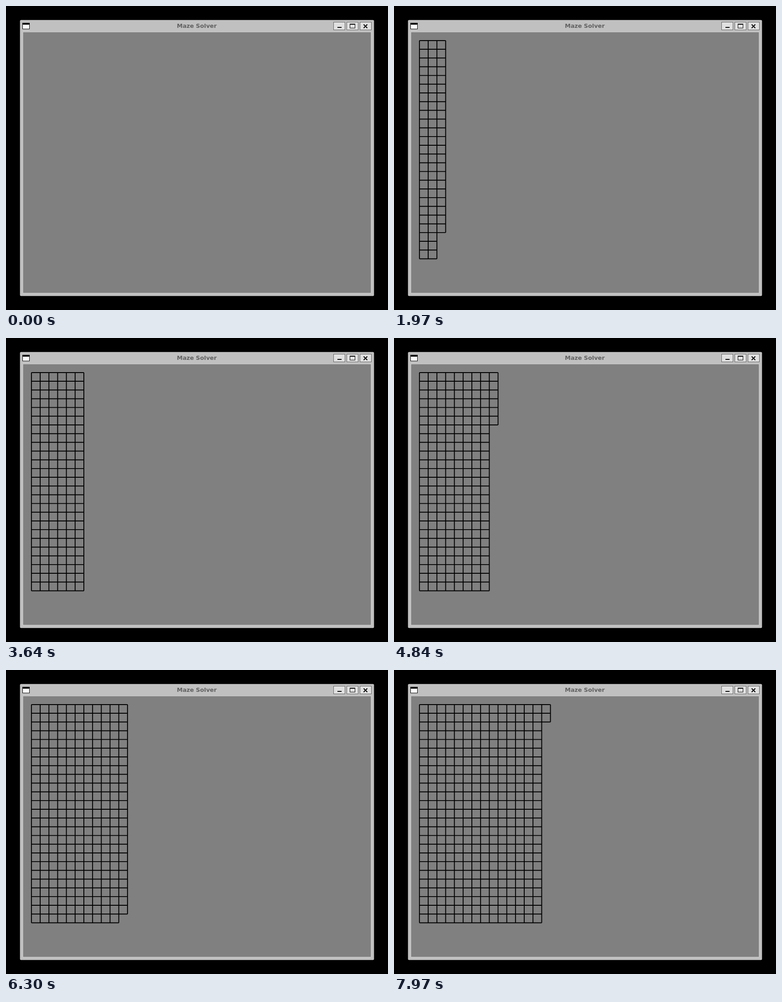
Recreate the animation shown at these times as an HTML page. Size 839x668 px, loop 8 s.

```html
<!DOCTYPE html>
<html lang="en">
<head>
<meta charset="utf-8">
<title>Maze Solver</title>
<style>
  html, body { margin: 0; width: 100%; height: 100%; overflow: hidden; background: #000; }
  svg { display: block; }
  .title { font: bold 12.8px "DejaVu Sans", sans-serif; fill: #606060; text-anchor: middle; }
  .button { fill: #e0e0e0; stroke: #626262; }
  .glyph { fill: none; stroke: #000; }
</style>
</head>
<body>
<svg width="839" height="668" viewBox="0 0 839 668">
  <rect width="839" height="668" fill="#000"/>
  <rect x="30.7" y="30.7" width="777.6" height="606.6" rx="2.5" fill="#c0c0c0"/>

  <rect x="36" y="37" width="16" height="14" fill="#000"/>
  <rect x="37" y="41" width="14" height="9" fill="#fff"/>
  <text class="title" x="419" y="48">Maze Solver</text>

  <rect class="button" x="719.5" y="35.5" width="25" height="17"/>
  <rect class="button" x="748.5" y="35.5" width="25" height="17"/>
  <rect class="button" x="777.5" y="35.5" width="25" height="17"/>
  <path class="glyph" stroke-width="2" d="M728 47h9M755 40h12M785.5 40.5l8 8m0 -8l-8 8"/>
  <rect class="glyph" x="755.5" y="39.5" width="11" height="9"/>

  <rect x="37" y="57" width="765" height="574" fill="#808080" stroke="#d8d8d8"/>
  <path id="grid" fill="none" stroke="#000" stroke-width="1.95"/>
</svg>
<script>
  const LOOP = 8000, START = 500, STEP = 200 / 3;
  const LEFT = 55.9, TOP = 75.9, CELL = 19.18, ROWS = 25;
  const FIRST_CELLS = 3.8, CELLS_PER_STEP = 3.115;
  const grid = document.getElementById('grid');
  let shown = -1;

  function cellsAt(time) {
    if (time < START) return 0;
    const tick = Math.floor(time / 10) * 10;
    const step = Math.floor((tick - START) / STEP + 1e-6);
    return Math.floor(FIRST_CELLS + step * CELLS_PER_STEP);
  }

  // Cells fill column by column, from the top down.
  function gridPath(count) {
    if (!count) return '';
    const full = Math.floor(count / ROWS);
    const part = count % ROWS;
    let d = '';
    for (let row = 0; row <= ROWS; row++) {
      const cols = full + (part && row <= part ? 1 : 0);
      if (cols) d += `M${LEFT} ${TOP + row * CELL}h${cols * CELL}`;
    }
    for (let col = 0; col <= full + 1; col++) {
      const rows = full && col <= full ? ROWS : part;
      if (rows) d += `M${LEFT + col * CELL} ${TOP}v${rows * CELL}`;
    }
    return d;
  }

  const begin = performance.now();
  function draw() {
    const count = cellsAt((performance.now() - begin) % LOOP);
    if (count !== shown) {
      grid.setAttribute('d', gridPath(count));
      shown = count;
    }
    requestAnimationFrame(draw);
  }
  draw();
</script>
</body>
</html>
```
